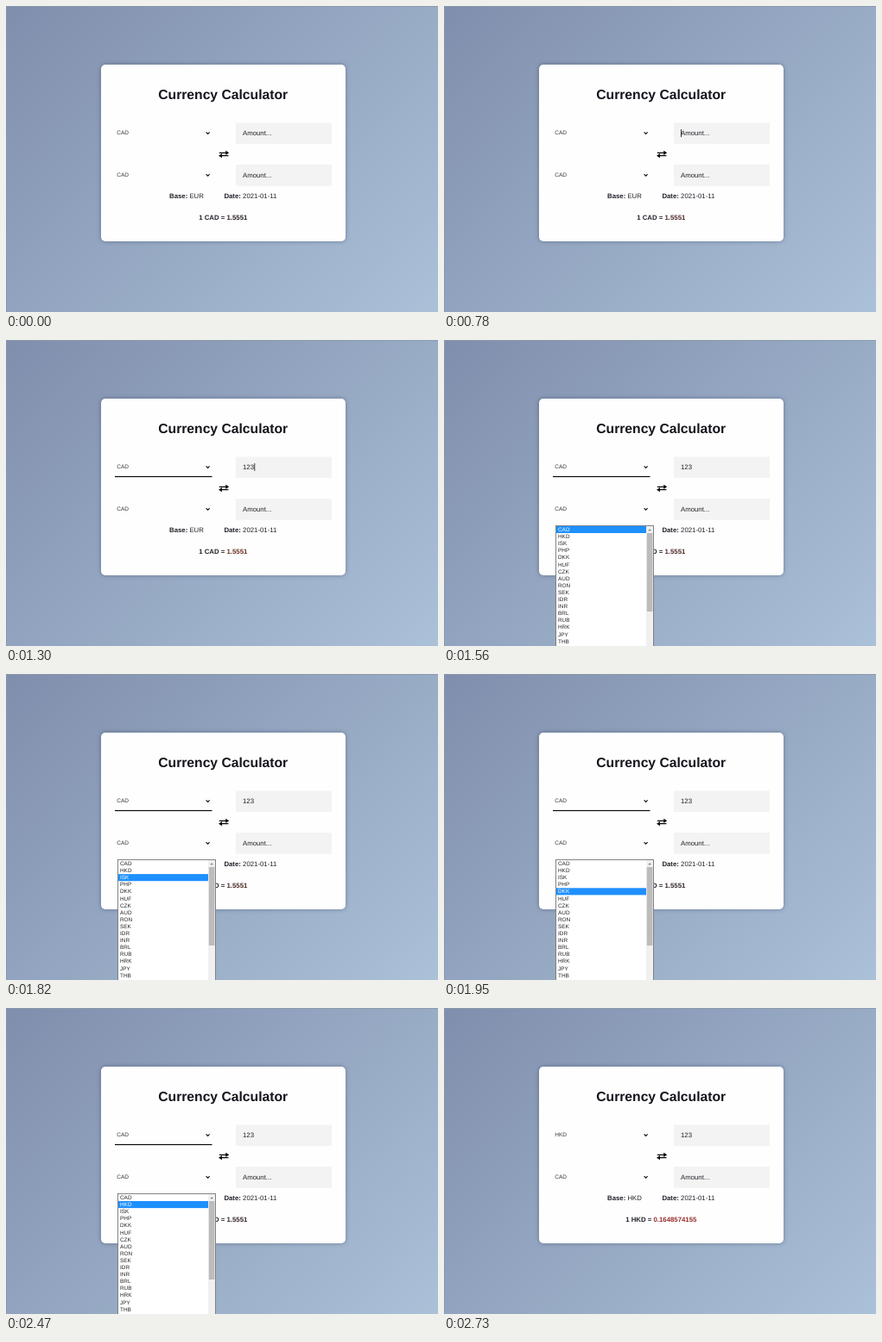
An HTML page that plays this animation: 500x355 px, repeating every 4.16 s.

```html
<!DOCTYPE html>
<html lang="en">
<head>
<meta charset="utf-8">
<title>Currency Calculator</title>
<style>
  html, body { margin: 0; width: 100%; height: 100%; overflow: hidden; background: #93a6c2; }
  svg { display: block; width: 500px; height: 355px; }
  text { font-family: "Liberation Sans", Arial, sans-serif; font-size: 7.8px; fill: #24222a; text-rendering: geometricPrecision; }
  .b { font-weight: bold; }
  .title { font-size: 15.7px; font-weight: bold; fill: #17131d; }
  .pick { font-size: 6.5px; fill: #35333c; }
  .row { font-size: 6.4px; fill: #222; }
  .card { filter: drop-shadow(0 0 2.5px rgba(20, 30, 60, .38)); }
</style>
</head>
<body>
<svg viewBox="0 0 500 355" xmlns="http://www.w3.org/2000/svg">
  <defs>
    <linearGradient id="bg" gradientUnits="userSpaceOnUse" x1="36" y1="-36" x2="464" y2="391">
      <stop offset="0" stop-color="#7f8eac"/>
      <stop offset="1" stop-color="#abc1d8"/>
    </linearGradient>
  </defs>
  <rect width="500" height="355" fill="url(#bg)"/>
  <path d="M0 .5H500M.5 0V355" stroke="#8d98a8" opacity=".8"/>

  <rect class="card" x="110" y="68" width="283" height="205" rx="5" fill="#fefefe"/>
  <text class="title" x="251.2" y="108.3" text-anchor="middle">Currency Calculator</text>

  <rect x="266" y="135.5" width="111" height="24.5" fill="#f3f3f3"/>
  <rect x="266" y="184" width="111" height="24.7" fill="#f3f3f3"/>
  <text id="from" class="pick" x="128.2" y="149.3"></text>
  <text class="pick" x="128.2" y="198.1">CAD</text>
  <path d="M231.6 146.4l2 2 2-2M231.6 195.1l2 2 2-2" fill="none" stroke="#111" stroke-width="1.2"/>
  <rect id="line" x="126" y="157.9" width="112.5" height="1.2" fill="#0a0a0a"/>
  <text id="amount" x="274" y="150.3"></text>
  <text x="274" y="199">Amount...</text>
  <rect id="caret" y="143" width=".8" height="9" fill="#111"/>

  <g fill="#0c0c0c">
    <path d="M246.8 169.7h7.4v-2l4 2.6-4 2.6v-2h-7.4z"/>
    <path d="M257.4 174.3h-7.4v2l-4-2.6 4-2.6v2h7.4z"/>
  </g>

  <text x="189" y="223.2"><tspan class="b">Base:</tspan> <tspan id="base"></tspan></text>
  <text x="252.4" y="223.2"><tspan class="b">Date:</tspan> 2021-01-11</text>
  <text class="b" x="251.3" y="247.8" text-anchor="middle"><tspan id="unit"></tspan> = <tspan id="rate"></tspan></text>

  <g id="menu">
    <rect x="129.5" y="215.5" width="113" height="150" fill="#fff" stroke="#777" stroke-width=".9"/>
    <rect x="234" y="216" width="8" height="140" fill="#f0f0f0"/>
    <rect x="234.8" y="224" width="6.6" height="91" fill="#bcbcbc"/>
    <path d="M236.3 221.2l1.8-2 1.8 2z" fill="#777"/>
    <rect id="mark" x="130" width="104" height="8.1" fill="#1e90ff"/>
    <g id="rows"></g>
  </g>
</svg>
<script>
const $ = id => document.getElementById(id);
const LOOP = 4160, PITCH = 8.1;
const codes = "CAD HKD ISK PHP DKK HUF CZK AUD RON SEK IDR INR BRL RUB HRK JPY THB CHF".split(" ");

const rows = codes.map((code, i) => {
  const row = document.createElementNS("http://www.w3.org/2000/svg", "text");
  row.setAttribute("class", "row");
  row.setAttribute("x", 132);
  row.setAttribute("y", 222 + i * PITCH);
  row.textContent = code;
  $("rows").append(row);
  return row;
});

// each step overrides the one before it
const steps = [
  { at: 0, typed: "", caret: 0, line: false, row: -1, from: "CAD", base: "EUR", rate: "1.5551", ink: "#2a2023" },
  { at: 780, caret: 274, ink: "#4f2a26" },
  { at: 1040, typed: "12", caret: 283.2 },
  { at: 1300, typed: "123", caret: 287.4, line: true, ink: "#6b3022" },
  { at: 1560, caret: 0, row: 0, ink: "#4f2a26" },
  { at: 1820, row: 2 },
  { at: 1950, row: 4, ink: "#352629" },
  { at: 2340, row: 2 },
  { at: 2470, row: 1 },
  { at: 2730, line: false, row: -1, from: "HKD", base: "HKD", rate: "0.1648574155", ink: "#982f2b" }
];

const show = (id, on) => $(id).setAttribute("visibility", on ? "visible" : "hidden");

function draw(ms) {
  const s = Object.assign({}, ...steps.filter(step => step.at <= ms));
  $("from").textContent = s.from;
  $("amount").textContent = s.typed || "Amount...";
  $("base").textContent = s.base;
  $("unit").textContent = "1 " + s.from;
  $("rate").textContent = s.rate;
  $("rate").style.fill = s.ink;
  $("caret").setAttribute("x", s.caret);
  show("caret", s.caret > 0);
  show("line", s.line);
  show("menu", s.row >= 0);
  $("mark").setAttribute("y", 215.9 + Math.max(0, s.row) * PITCH);
  rows.forEach((row, i) => row.style.fill = i === s.row ? "#fff" : "#222");
}

const start = performance.now();
function tick() {
  draw((performance.now() - start) % LOOP);
  requestAnimationFrame(tick);
}
tick();
</script>
</body>
</html>
```
